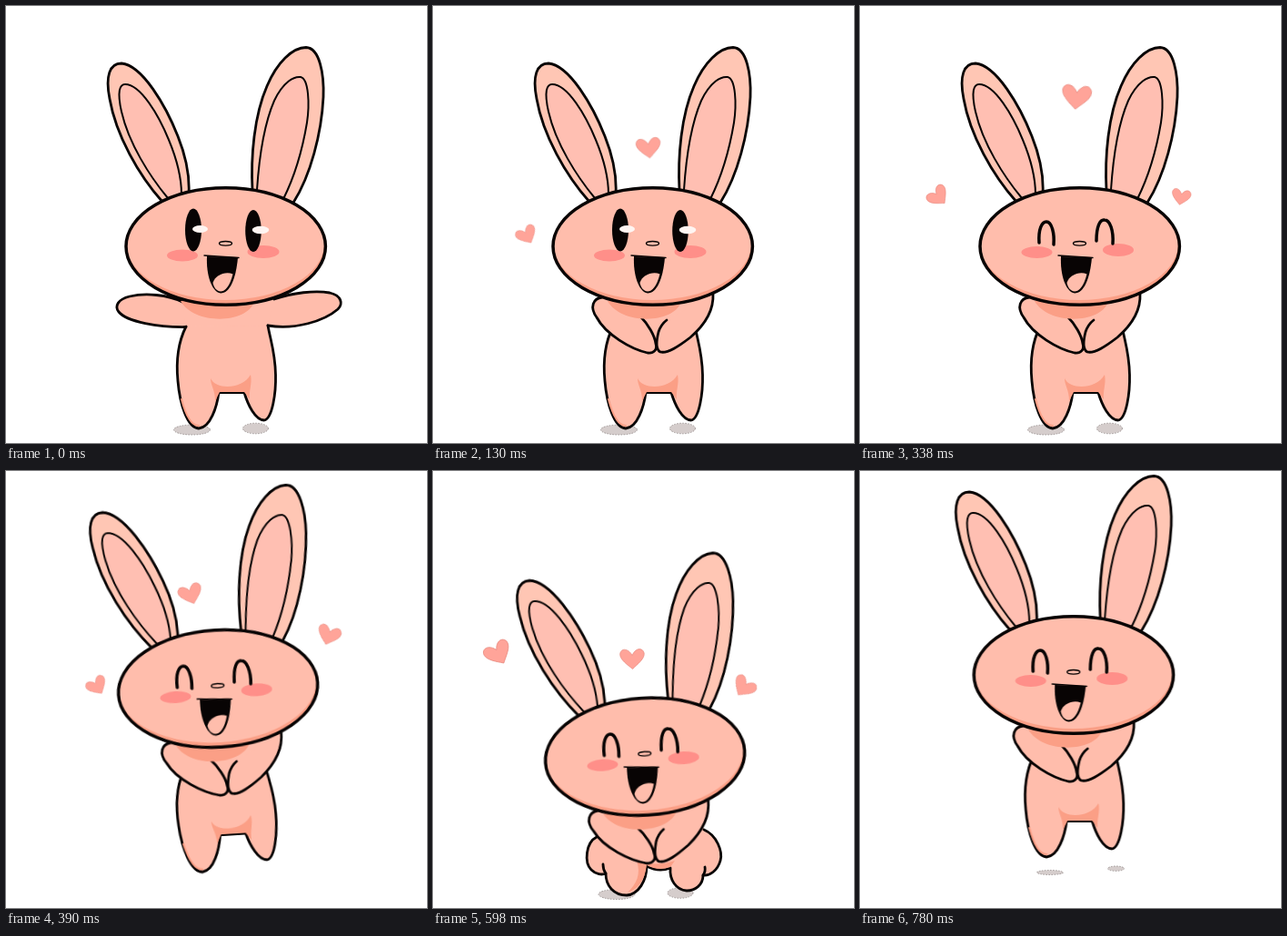
Animation of 463 by 480 pixels, one loop 0.91 s. Source, as an HTML page:

```html
<!DOCTYPE html>
<html lang="en">
<head>
<meta charset="utf-8">
<title>Happy bunny</title>
<style>
  html, body { margin: 0; width: 100%; height: 100%; overflow: hidden; background: #fff; }
  svg { display: block; width: 100vw; height: 100vh; }

  .line { fill: none; stroke: #080404; stroke-width: 2.8; stroke-linecap: round; stroke-linejoin: round; }
  .skin { fill: #ffbdac; }
  .plain { fill: #ffbdac; stroke: none; }
  .ear { fill: #ffc6b4; }
  .inner { fill: #ffbfb2; stroke-width: 2; }
  .shade { fill: #fb9f86; stroke: none; }
  .cheek { fill: #ff8f89; stroke: none; }
  .ink { fill: #080404; stroke: none; }
  .white { fill: #fff5f2; stroke: none; }
  .bold { stroke-width: 3.5; }
  .fine { stroke-width: 1.4; }
  .ground { fill: #d5cdcc; stroke: #8d8583; stroke-width: .8; stroke-dasharray: 1.5 1.5; }
  .hearts { fill: #ffa499; stroke: #e58379; stroke-width: .6; }

  /* Seven held poses of 130 ms each */
  .hop, .slot, .part { animation: 910ms step-end infinite; }
  .hop { animation-name: hop; transform-origin: 242px 264px; }
  .slot { visibility: hidden; animation-name: first; animation-delay: calc(var(--i) * 130ms); }
  .greet { animation-name: first; }
  .hug { animation-name: hug; }
  .wide { animation-name: wide; }
  .smile { animation-name: smile; }
  .stand { animation-name: stand; }
  .still { animation-name: still; }
  .land { animation-name: land; }

  @keyframes hop {
    0% { transform: none; }
    42.8571% { transform: translate(-8.5px, -25px) rotate(-3.6deg); }
    57.1428% { transform: translate(-8.5px, 49.7px) rotate(-3.6deg); }
    71.4285% { transform: translate(-10.3px, 27.7px) rotate(-3.6deg); }
    85.7142%, 100% { transform: translate(-6.7px, -40px); }
  }
  @keyframes first { 0% { visibility: visible; } 14.2857%, 100% { visibility: hidden; } }
  @keyframes hug { 0% { visibility: hidden; } 14.2857%, 100% { visibility: visible; } }
  @keyframes wide { 0% { visibility: visible; } 28.5714%, 100% { visibility: hidden; } }
  @keyframes smile { 0% { visibility: hidden; } 28.5714%, 100% { visibility: visible; } }
  @keyframes stand { 0% { visibility: visible; } 57.1428% { visibility: hidden; } 85.7142%, 100% { visibility: visible; } }
  @keyframes still { 0% { visibility: visible; } 42.8571%, 100% { visibility: hidden; } }
  @keyframes land { 0% { visibility: hidden; } 57.1428% { visibility: visible; } 85.7142%, 100% { visibility: hidden; } }
</style>
</head>
<body>
<svg viewBox="0 0 463 480">
  <defs>
    <path id="heart" d="M1 11.500C-5 7-13 2-13.500-4C-13.500-11-5-12 0-3.500C3-12 11-13 13-6.500C14 0 6 6 1 11.500Z"/>
    <g id="shadows">
      <ellipse cx="204.5" cy="465.5" rx="20" ry="5.5"/>
      <ellipse cx="274.5" cy="464" rx="14" ry="5.8"/>
    </g>
  </defs>

  <g class="ground">
    <use href="#shadows" class="part still"/>
    <use href="#shadows" class="part land" x="-2.5" y="-.5"/>
    <g class="slot" style="--i:6">
      <ellipse cx="209" cy="441" rx="14.5" ry="2.5"/>
      <ellipse cx="281.5" cy="436.7" rx="9" ry="2.7"/>
    </g>
  </g>

  <!-- Squat -->
  <g class="line slot" style="--i:4">
    <path class="plain" d="M180 403L195 360H280L299 395Z"/>
    <path class="skin" d="M180 402C168 408 166 430 174 438C179 443 186 444 190 442C190 456 199 466 213 466C226 465 235 450 235 434Q248 441 261 436C260 449 267 460 279 461C288 461 297 455 297 444C304 445 313 439 316 428C319 418 312 400 298 394"/>
    <path class="shade" d="M224 428Q246 435 266 428L261 435Q248 440 235 433C233 449 226 459 214 463C224 453 229 443 224 428Z"/>
    <path d="M187 432Q187 438 190 442M299 435Q300 440 297 444"/>
  </g>

  <!-- Rebound -->
  <g class="line slot" style="--i:5">
    <path class="plain" d="M195 340H280L288 385H190Z"/>
    <path class="skin" d="M191 390C186 412 184 440 191 452C197 463 205 466 212 466C225 466 231 456 231 446C231 441 232 438 236 437Q246 440 257 437C258 451 267 461 279 461C292 460 298 448 297 432C297 412 291 392 286 380"/>
    <path class="shade" d="M221 418C227 431 256 430 266 415C268 424 263 432 263 440L257 436Q246 439 234 436L227 443C227 431 222 426 221 418Z"/>
  </g>

  <g class="hop line">
    <g class="part stand">
      <path class="plain" d="M190 318H298L288 356H198Z"/>
      <path class="skin" d="M198 352C189 370 187 392 189 412C191 436 199 463 212 464C225 463 232 440 234 424.5H262C266 438 274 455 284 455C293 453 297 425 296.5 405C296 380 291 368 288 351"/>
      <path class="shade" d="M225 409C231 422 260 421 269 405C271 415 267 422 268 432L262 424H235L230 434C230 421 225 417 225 409Z"/>
      <path d="M193 432C198 451 204 461 212 461" style="stroke:#fb9f86;stroke-width:2"/>
    </g>

    <g class="part greet">
      <path class="skin" d="M194 325C178 317 153 315 136 319C123 322 119 330 124 336C133 347 168 353 198 352.5"/>
      <path class="skin" d="M295 322C315 315 340 312 356 315C369 318 371 327 365 333C350 346 318 356 288 351"/>
    </g>
    <g class="part hug">
      <path class="plain" d="M188 312H308L303 334L284 358L246 372L205 352Z"/>
      <path class="skin" d="M186 320C176 321 172 331 180 342C190 361 218 377 236 381C243 382 247 377 245 371C244 362 236 349 229 342"/>
      <path class="skin" d="M308 316C309 335 297 352 283 364C270 374 258 382 250 380C244 377 246 366 248 358C250 352 253 348 257 345"/>
    </g>
    <path class="shade" d="M192 324C206 350 264 350 273 325Z"/>

    <path class="ear" d="M172 215C146 186 121 142 114 102C109 77 114 63 127 63C150 65 176 110 189 143C199 168 202 190 201 207"/>
    <path class="inner" d="M178 211C158 187 135 151 127 116C122 94 125 86 131 86C148 86 168 120 179 147C189 171 193 188 193 207"/>
    <path class="ear" d="M271 203C269 165 273 120 287 88C298 62 315 45.5 330 45.500C345 46 350 75 349 100C347 140 335 186 316 216"/>
    <path class="inner" d="M276 202C278 172 282 134 295 104C305 83 317 77 324 78C333 80 334 108 331 128C326 158 316 190 305 212"/>

    <ellipse class="shade" cx="241.7" cy="264" rx="110" ry="64"/>
    <ellipse class="plain" cx="241" cy="261" rx="109" ry="62"/>
    <ellipse class="bold" cx="241.7" cy="264" rx="109.7" ry="64.2"/>

    <g class="part wide">
      <ellipse class="cheek" cx="194" cy="274" rx="17" ry="6.5"/>
      <ellipse class="cheek" cx="283" cy="270" rx="17.5" ry="7"/>
      <ellipse class="ink" cx="206" cy="246" rx="9" ry="23.5"/>
      <ellipse class="ink" cx="272" cy="247" rx="8.8" ry="23"/>
      <ellipse class="white" cx="213.5" cy="245" rx="8.5" ry="4"/>
      <ellipse class="white" cx="280" cy="246" rx="9.3" ry="4.2"/>
    </g>
    <g class="part smile">
      <ellipse class="cheek" cx="194.5" cy="270.5" rx="17" ry="6.5"/>
      <ellipse class="cheek" cx="284" cy="268" rx="17" ry="7"/>
      <path class="bold" d="M197 260C196 245 200 237 205 237C211 237 214 250 213 262M260 258C260 242 264 234 269 235C275 235 279 247 278 261"/>
    </g>

    <ellipse class="fine" cx="241.5" cy="260.800" rx="7" ry="2.300"/>
    <path class="ink" d="M221 275L255 276C253 300 246 315.5 236 315.5C226 314 220 295 221 275Z"/>
    <path class="plain" d="M227.5 304C230 296 241 291 249.5 294.5C246 308 241 313.5 236 313.5C231 313 228.5 309 227.5 304Z"/>
    <path class="fine" d="M218 274Q236 275 256 276.5"/>
  </g>

  <g class="hearts">
    <g class="slot" style="--i:1">
      <use href="#heart" transform="translate(237 155.5) rotate(-3)"/>
      <use href="#heart" transform="translate(103 251.5) rotate(-25) scale(.85)"/>
    </g>
    <g class="slot" style="--i:2">
      <use href="#heart" transform="translate(238 99.5) rotate(10) scale(1.2)"/>
      <use href="#heart" transform="translate(86 209) rotate(-38) scale(.9)"/>
      <use href="#heart" transform="translate(353 209.5) rotate(15) scale(.78)"/>
    </g>
    <g class="slot" style="--i:3">
      <use href="#heart" transform="translate(203 135) rotate(-15) scale(.97)"/>
      <use href="#heart" transform="translate(100 236) rotate(-28) scale(.85)"/>
      <use href="#heart" transform="translate(355 180) rotate(22) scale(.95)"/>
    </g>
    <g class="slot" style="--i:4">
      <use href="#heart" transform="translate(71.5 200) rotate(-25) scale(1.1)"/>
      <use href="#heart" transform="translate(219 206) rotate(2)"/>
      <use href="#heart" transform="translate(342 237) rotate(40) scale(.95)"/>
    </g>
    <g class="slot" style="--i:5">
      <use href="#heart" transform="translate(173 109) rotate(-20) scale(1.08)"/>
      <use href="#heart" transform="translate(87 223.5) rotate(-38)"/>
      <use href="#heart" transform="translate(359 259) rotate(45) scale(1.05)"/>
    </g>
  </g>
</svg>
</body>
</html>
```
